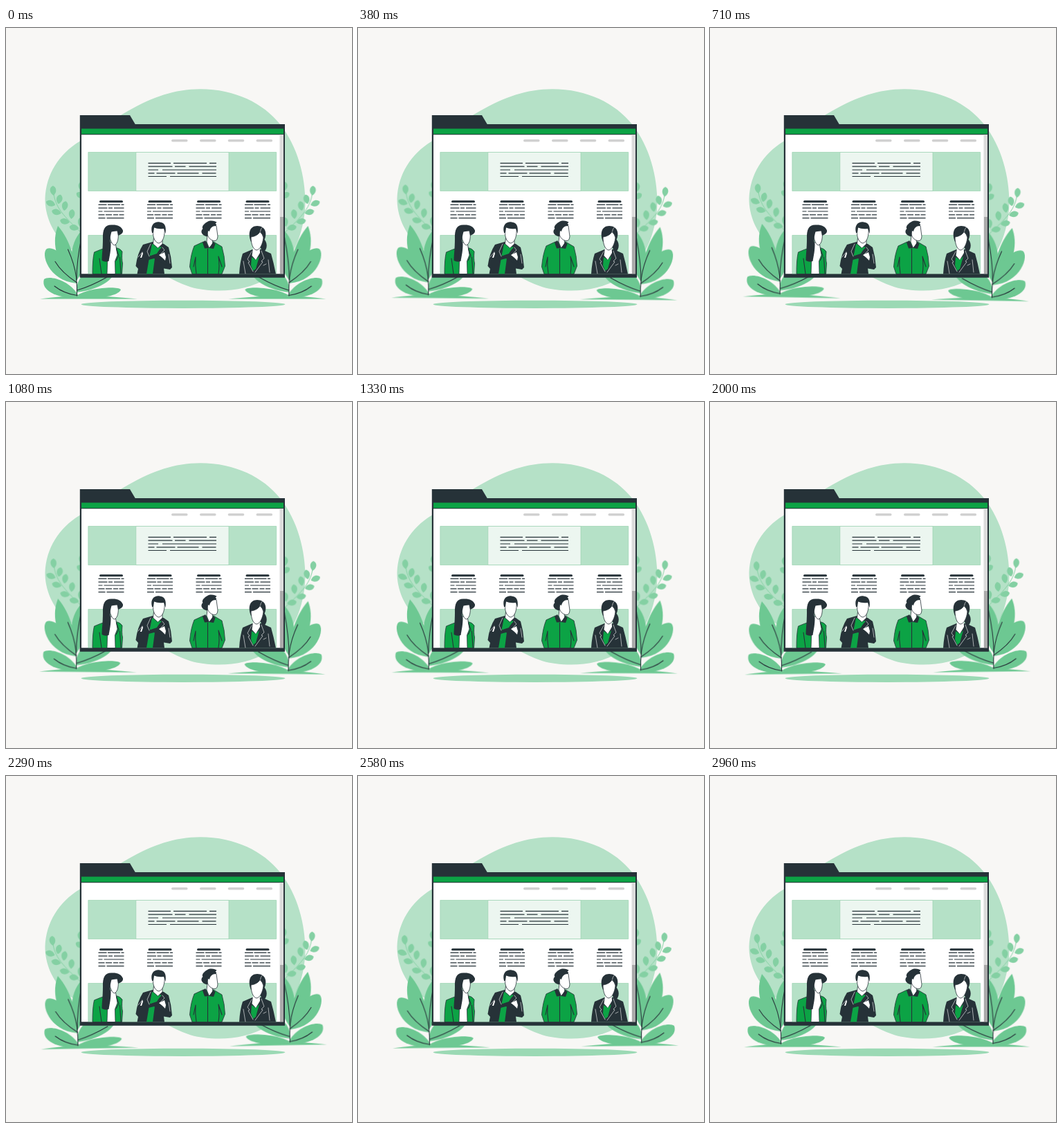
Recreate the animation shown at these times as an HTML page. Size 500 by 500 pixels, loop 3000 ms.

```html
<!DOCTYPE html>
<html lang="en">
<head>
<meta charset="utf-8">
<title>Team page</title>
<style>
  html, body { margin: 0; width: 100%; height: 100%; overflow: hidden; background: #f8f7f5; }
  svg { display: block; width: 100vw; height: 100vh; }
  .dark { fill: #263238; }
  .green { fill: #0ca345; }
  .pale { fill: #b5e1c7; }
  .panel { stroke: #93cfaa; stroke-width: .6; }
  .white { fill: #fff; }
  .ink { fill: none; stroke: #263238; stroke-width: 1.1; stroke-linecap: round; stroke-linejoin: round; }
  .edge { stroke: #263238; stroke-width: .8; stroke-linejoin: round; }
  .seam { fill: none; stroke: #fff; stroke-width: .6; stroke-linecap: round; stroke-linejoin: round; }
  .text { fill: none; stroke: #263238; stroke-width: 1.2; }
  .leaf { fill: #6dc892; }
  .sprig { fill: #84d0a3; }
  .sway { transform-origin: 255.7px 300px; animation: wind 3s linear infinite; }
  @keyframes wind {
    0%, 100% { transform: rotate(0deg); }
    25% { transform: rotate(1deg); }
    75% { transform: rotate(-1deg); }
  }
</style>
</head>
<body>
<svg viewBox="0 0 500 500">
  <defs>
    <path id="bud" d="M0 7C-5.500 3-6-5 .500-7C6-4 5.500 3 0 7Z"/>

    <g id="plant">
      <g class="sprig">
        <path d="M69 240C72 262 88 276 112 299" fill="none" stroke="#84d0a3" stroke-width="1"/>
        <use href="#bud" transform="translate(68 235) rotate(-6)"/>
        <use href="#bud" transform="translate(77 247.5) rotate(12)"/>
        <use href="#bud" transform="translate(64.5 253.5) rotate(-72)"/>
        <use href="#bud" transform="translate(85 257) rotate(8)"/>
        <use href="#bud" transform="translate(73 266) rotate(-78)"/>
        <use href="#bud" transform="translate(95 269) rotate(6)"/>
        <use href="#bud" transform="translate(85 279.5) rotate(-80)"/>
        <use href="#bud" transform="translate(108 280) rotate(10)"/>
        <use href="#bud" transform="translate(98.5 288.5) rotate(-82)"/>
        <use href="#bud" transform="translate(109 229) rotate(-8)"/>
        <use href="#bud" transform="translate(108 242) rotate(-65)"/>
      </g>
      <g class="leaf">
        <path d="M49 391.500Q106 383 190 391.500Z"/>
        <path d="M75 286C67 306 68 338 101 366C103 342 93 306 75 286Z"/>
        <path d="M119 285C99 297 86 326 101 366C118 345 124 310 119 285Z"/>
        <path d="M59 319C50 325 60 365 102 369C105 350 75 313 59 319Z"/>
        <path d="M55 363C62 357 92 364 104 386L103 389C82 392 49 382 55 363Z"/>
        <path d="M102 382C100 362 118 340 158 345C162 358 140 378 102 382Z"/>
        <path d="M102 387C116 376 161 372 166 378C163 388 124 394 102 387Z"/>
      </g>
      <g class="ink">
        <path d="M102.500 387Q103 374 101.500 360Q99 341 89.500 320"/>
        <path d="M102 364Q102 337 109 303"/>
        <path d="M71 337.500Q80 353 102.500 368"/>
        <path d="M70 373Q84 384 103 386.500"/>
        <path d="M102.800 379Q123 373 146 360"/>
      </g>
    </g>

    <g id="column">
      <path d="M136.500 250.700H167.500" stroke="#263238" stroke-width="3" stroke-linecap="round"/>
      <path class="text" d="M133.500 255.400h12m1.500 0h18m1.500 0h4M133.500 260.200h13m1.500 0h6m2 0h14.500M133.500 265h6m2 0h29M133.500 269.800h9m1.500 0h9m2 0h7m1.500 0h7M133.500 274.600h10m2 0h25"/>
    </g>
  </defs>

  <rect width="500" height="500" fill="#f8f7f5"/>
  <path class="pale" d="M281 88.300C331 88.300 372 109 396 139C422 172 432.500 215 432.500 253C431.500 296 414 340 379 361C350 379 315 382 285 378C258 375 243 363 216 352C178 338 120 342 87 314C67 297 56 270 56.500 246C58 212 76 182 107 163.500C134 147 152 133.500 177 119.500C212 100 243 88.300 281 88.300Z"/>
  <ellipse cx="256" cy="399.300" rx="147.500" ry="5.600" fill="#9bd9b4"/>

  <g class="sway">
    <use href="#plant"/>
    <use href="#plant" transform="translate(511.4) scale(-1 1)"/>
  </g>

  <!-- window -->
  <path class="dark" d="M106.800 126H179L186.700 139H403V360.500H106.800Z"/>
  <path class="green" d="M109 145.500H401V153.200H109Z"/>
  <path class="white" d="M109 154.200H401V355.500H109Z"/>
  <path fill="#dcdcdc" d="M395.500 154.200H401V355.500H395.500Z"/>
  <path fill="#aaa" d="M396 273H401V355.500H396Z"/>
  <path d="M240.800 162.800h20M281.800 162.800h20M322.500 162.800h20M363.300 162.800h20" stroke="#d1d1d1" stroke-width="3.600" stroke-linecap="round"/>

  <path class="pale panel" d="M118.800 179.500H390.700V235.500H118.800Z"/>
  <path class="panel" fill="#ecf6f0" d="M187.800 179.500H322V235.500H187.800Z"/>
  <path class="text" d="M205.500 195.400h32.500m4 0h48m4 0h10M205.500 200.200h35m3.500 0h15.500m5 0h39.500M205.500 205h14.500m6 0h78M205.500 209.800h9m3 0h27m3 0h31m5 0h20M205.500 214.500h26.500m5 0h67"/>

  <use href="#column"/>
  <use href="#column" x="70.500"/>
  <use href="#column" x="141"/>
  <use href="#column" x="211.500"/>
  <path class="pale panel" d="M118.800 299.500H390.700V355.500H118.800Z"/>

  <!-- long-haired woman -->
  <g>
    <path class="green edge" d="M125 355.500Q125 334 127.500 324Q136 320 147 317H158Q166 319 168 323Q167 334 168.500 340L167.500 355.500Z"/>
    <path class="white edge" d="M147 322L151 310H158L159.500 319L161 328L157.500 337L158 355.500H146Z"/>
    <path class="ink" d="M135 333L138 355M164.500 331L166 355M159.500 319L163 329L159 336"/>
    <path class="white edge" d="M149 293H162C163 302 162 312 156.500 314C152 312 149.500 304 149 293Z"/>
    <path class="dark" d="M153 284.500C143 284 139.500 291 140 304C140 319 138.500 328 138.500 336Q143 339 148.500 337C150 328 151.500 322 151.500 312C149.500 306 151 300 152.500 294.500L160.500 293L162 300C167 298 169.500 296 169 292.500C167 286.500 160 284 153 284.500Z"/>
  </g>

  <!-- man with folded arms -->
  <g>
    <path class="dark" d="M198 313L212 309L228 312L235 317Q239 331 240 346L237 349L228 347.500L229 355.500H189.500L191 348L187.500 344Q190 325 198 313Z"/>
    <path class="green" d="M211 312L225 317Q219 322 215 333L212 355.500H203L207 332Z"/>
    <path class="dark" d="M203 331L218 326L232 336L230 342L214 333L202 336Z"/>
    <path class="seam" d="M209 312L204 323L207 330M226 317L229 321L222 328M191 331L196 325M235 327L237 340"/>
    <path class="white" d="M194 332L197 323L198 326L196 332ZM221 328L229 324L231 331L230 336L226 332Z"/>
    <path class="white edge" d="M213.500 303L212.500 312L219.500 318L226 312V304Z"/>
    <path class="white edge" d="M213 288C211 300 214 309 220.500 311C227 310 230 300 229 288Q220 284 213 288Z"/>
    <path class="dark" d="M211 296C208 284 215 279.500 222 280.500C229 281 232 286 230.500 297L228 290Q219 291 214 288.500L213 296Z"/>
  </g>

  <!-- man in green shirt -->
  <g>
    <path class="green edge" d="M285 309L300 309L312 316Q316 330 316.500 344L312 355.500H269L265.500 345Q267 327 272 315Z"/>
    <path class="ink" d="M274 331Q273 343 275 355M307 330Q309 343 307 355M291.500 319V355M274 331L271 345M307 330L312 345"/>
    <path class="white edge" d="M291 299L290 309L293.500 318L299 312L298 304Z"/>
    <path class="dark" d="M288 307L293.500 318L287 318.500L284 310ZM299.500 309L302.500 312L300 319L293.500 318Z"/>
    <path class="white edge" d="M291 294C294 286 301 284 304 286L306 301Q305.500 308 301 307.500C295 307 290 301 291 294Z"/>
    <path class="dark" d="M291 301.500C283 300 280 294 284.500 290C281.500 286 290 279.500 295 278.500C300 278 303 280 304.500 280.500L302.500 283Q305.500 284 303 286C298 286 295 289 294 294L292 293Z"/>
  </g>

  <!-- woman in dark jacket -->
  <g>
    <path class="dark" d="M372 304C378 309 379 320 371 325L366 313ZM342 326L356 320H370L383 326Q387 340 390 355.500H337Q338 338 342 326Z"/>
    <path class="green" d="M355 331L361 335L366 330L361 348L357 351L354 343Z"/>
    <path class="white" d="M357.500 314H366.500L367 325L361 335L355.500 329Z"/>
    <path class="seam" d="M355 323L349 334L352 338L350 339L357 352M369 322L373 333L369 337L371 338L360 353M343 337L346 355M379 335L381 353M372 343L376 341"/>
    <path class="dark" d="M354 309C349 297 352 286 363 286C375 286 378 297 373 307L369 314Z"/>
    <path class="white edge" d="M354 302C361 301 365 298 367 294.500Q371 298 372 303C371 312 367 320.500 362 321C357 320 354 312 354 302Z"/>
    <path class="seam" d="M367.500 294Q368 290 370 288.500"/>
  </g>

  <path class="dark" d="M106.800 355.500H403V360.500H106.800Z"/>
</svg>
</body>
</html>
```
